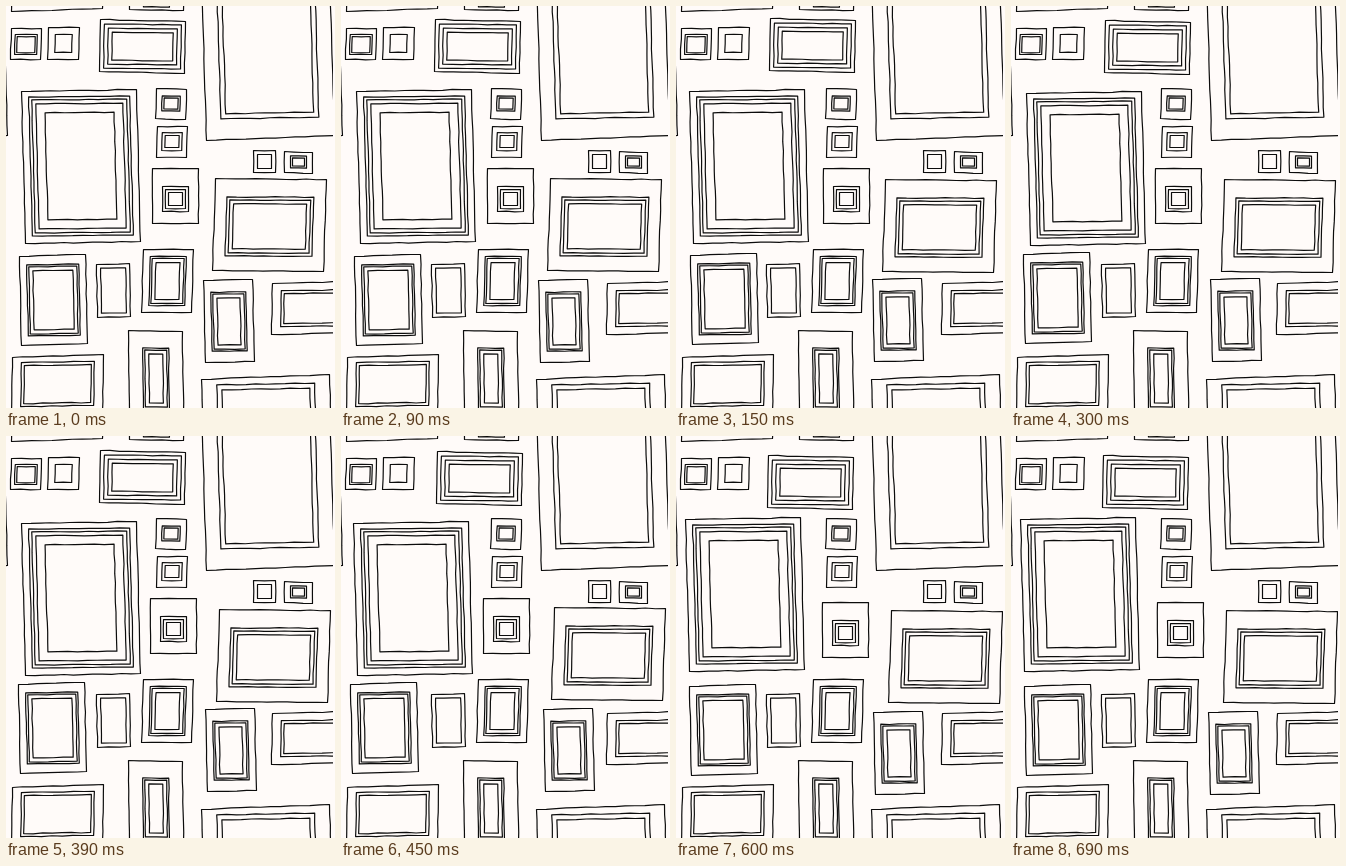
Animation of 329 by 402 pixels, one loop 750 ms. Source, as an HTML page:

```html
<!DOCTYPE html>
<html lang="en">
<head>
<meta charset="utf-8">
<title>Hopping picture frames</title>
<style>
html, body { margin: 0; width: 100%; height: 100%; overflow: hidden; background: #fffbf9; }
svg { display: block; width: 329px; height: 402px; }
path { fill: none; stroke: #0c0c0c; stroke-width: 1.2; stroke-linejoin: round; }
</style>
</head>
<body>
<svg viewBox="0 0 329 402">
  <clipPath id="page"><rect width="327" height="402"/></clipPath>
  <g id="wall" clip-path="url(#page)"></g>
</svg>
<script>
const STEP = 150, TILE_W = 327, TILE_H = 402;
const wall = document.getElementById('wall');

let seed = 11;
const rand = () => (seed = (seed * 16807) % 2147483647) / 2147483647;

function add(parent, name, attrs = {}) {
  const el = document.createElementNS('http://www.w3.org/2000/svg', name);
  for (const key in attrs) el.setAttribute(key, attrs[key]);
  return parent.appendChild(el);
}

// Closed outline through the corners, drawn with a slightly shaky hand.
function penLine(corners) {
  let d = '';
  corners.forEach(([ax, ay], i) => {
    const [bx, by] = corners[(i + 1) % corners.length];
    const len = Math.hypot(bx - ax, by - ay);
    const n = Math.max(1, Math.round(len / 10));
    for (let k = 0; k < n; k++) {
      const t = k / n, off = k ? (rand() - 0.5) * 0.8 : 0;
      const x = ax + (bx - ax) * t - (by - ay) / len * off + 0.5;
      const y = ay + (by - ay) * t + (bx - ax) / len * off + 0.5;
      d += `${d ? 'L' : 'M'}${x.toFixed(2)} ${y.toFixed(2)}`;
    }
  });
  return d + 'Z';
}

// Holds each offset for one step, then jumps to the next.
function hop(g, offsets) {
  const poses = [[0, 0], ...offsets, [0, 0]];
  const keys = poses.map(([x, y]) => ({
    transform: `translate(${x}px, ${y}px)`,
    easing: 'steps(1, end)'
  }));
  g.animate(keys, { duration: STEP * (poses.length - 1), iterations: Infinity });
}

// lean: how far the bottom is shifted sideways; tilt: how far the right side drops.
// Each inset adds an inner ring; pad is extra room above and below the rings.
function picture(x, y, w, h, { lean = 0, tilt = 0, insets = [], pad = [0, 0], wrap, hops }) {
  const g = add(wall, 'g');
  const ring = (inset, top, bottom, slope) => {
    const at = (u, v) => [x + u + lean * v / h, y + v + (tilt - slope) / 2 + slope * u / w];
    const l = inset, r = w - inset, t = inset + top, b = h - inset - bottom;
    add(g, 'path', { d: penLine([at(l, t), at(r, t), at(r, b), at(l, b)]) });
  };
  ring(0, 0, 0, tilt);
  for (const inset of insets) ring(inset, ...pad, tilt / 2);

  if (hops) hop(g, hops);
  if (wrap) {
    for (const dx of [0, -TILE_W])
      for (const dy of [0, -TILE_H])
        if (dx || dy) wall.append(Object.assign(g.cloneNode(true)));
    const copies = [...wall.children].slice(-3);
    copies.forEach((copy, i) => copy.setAttribute('transform',
      `translate(${i ? -TILE_W : 0} ${i === 1 ? 0 : -TILE_H})`));
  }
}

// Pictures that continue over the edges of the repeating paper
picture(6, 351, 91, 56, { lean: -1, tilt: -3, insets: [9, 12], pad: [-3, -3], wrap: true });
picture(122, 324, 54, 81, { lean: 1, tilt: 1, insets: [14, 16, 20], pad: [3, -11], wrap: true });
picture(195, 373, 128, 163, { lean: 5, tilt: -5, insets: [15, 20], pad: [-8, 5], wrap: true });
picture(266, 277, 120, 51, { lean: -1, tilt: -3, insets: [9, 12], pad: [-1, -2] });

// Still pictures
picture(5, 22, 30, 31, { lean: -1, insets: [4, 6], pad: [2, 1] });
picture(42, 21, 31, 32, { lean: -1, insets: [7] });
picture(150, 82, 30, 30, { lean: -1, tilt: 1, insets: [6, 8], pad: [1, 2] });
picture(151, 120, 30, 31, { lean: -1, insets: [5, 8], pad: [1, 2] });
picture(247, 144, 22, 22, { insets: [4] });
picture(278, 145, 28, 21, { tilt: 1, insets: [6, 8], pad: [-2, -1] });
picture(90, 258, 33, 53, { lean: 1, tilt: -1, insets: [4] });
picture(137, 243, 50, 63, { lean: -2, insets: [7, 9, 13] });

// Hopping pictures
picture(94, 13, 85, 52, {
  lean: -1, tilt: 2, insets: [4, 8, 12],
  hops: [[0, -1], [0, 1], [2, 2], [-2, 6]]
});
picture(15, 85, 115, 152, {
  lean: 4, tilt: -2, insets: [7, 10, 14, 23], pad: [-1, 0],
  hops: [[-2, 0], [0, 2], [-3, 2], [-6, -2]]
});
picture(146, 162, 46, 55, {
  insets: [10, 13, 16], pad: [8, 2],
  hops: [[1, 0], [-2, 0], [-4, 0], [0, 4]]
});
picture(209, 172, 111, 92, {
  lean: -3, tilt: 1, insets: [12, 15, 19], pad: [6, 3],
  hops: [[0, 1], [4, 1], [4, -1], [6, 2]]
});
picture(13, 250, 66, 89, {
  lean: 2, tilt: -2, insets: [7, 9, 13], pad: [2, 2],
  hops: [[1, -1], [-1, -2], [-4, -2], [0, 0]]
});
picture(197, 274, 49, 82, {
  lean: 2, tilt: -1, insets: [7, 9, 13], pad: [5, 4],
  hops: [[-1, -1], [2, -1], [5, -1], [0, 2]]
});
</script>
</body>
</html>
```
